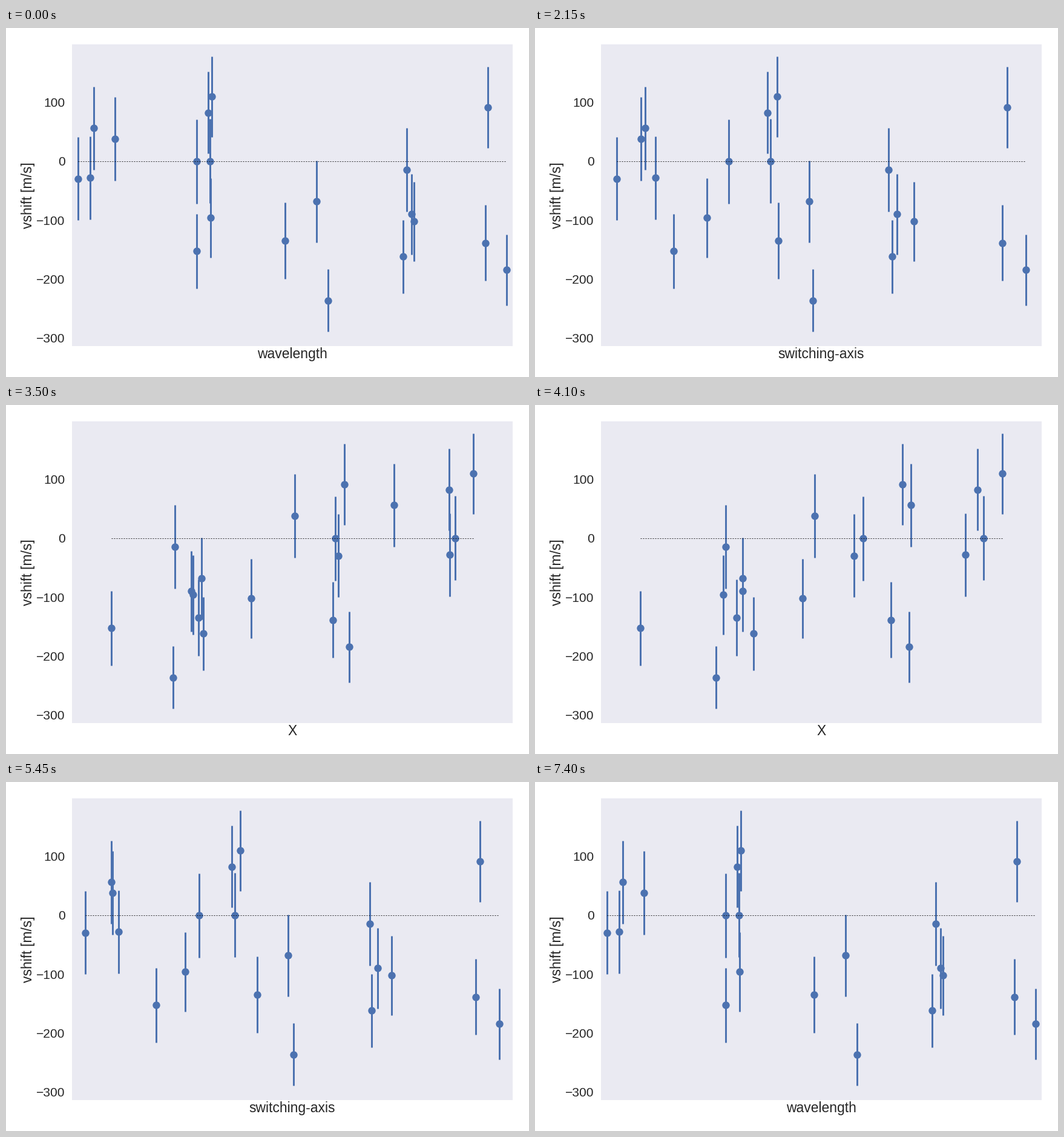
Recreate the animation shown at these times as a matplotlib script. Size 864x576 px, loop 7.5 s.

```python
import numpy as np
import matplotlib.pyplot as plt
from matplotlib.animation import FuncAnimation

FRAMES, INTERVAL = 150, 50
PAD = 10
BLUE, INK, PANEL = "#4C72B0", "#262626", "#EAEAF2"

plt.rcParams["font.family"] = "Liberation Sans"

# Key points: wavelength, X, vshift
wave, pos, shift = np.array([
    (0, 15.1, -29.4), (20, 43.6, -28.3), (26, 29.2, 56.2), (61, 3.3, 38.2),
    (196, 12.5, -0.6), (196, -45.4, -152.6), (215, 41.7, 82.4),
    (221, 48, 109.4), (218, 43.2, 0.4), (219, -24.4, -96.1),
    (341, -24.1, -134.9), (393, -23.8, -68.4), (412, -31.3, -236),
    (536, -24.6, -161.9), (542, -32, -14.6), (550, -27.9, -90),
    (554, -12.4, -102.3), (672, 7.6, -138.6), (676, 10.5, 91.4),
    (707, 11.5, -184.6),
]).T

# Errors shrink away from zero shift.
err = 71 - 0.0003 * (shift - 10) ** 2

# At 72 dpi one point is one pixel.
W, H = 864, 576
fig = plt.figure(figsize=(W / 72, H / 72), dpi=72, facecolor="white")
ax = fig.add_axes([109.2 / W, 51.2 / H, 727.7 / W, 498.1 / H], facecolor=PANEL)
ax.set_ylim(-313.4, 198.6)
ax.set_xticks([])
ax.set_yticks(range(-300, 101, 100))
ax.tick_params(axis="y", length=0, pad=11.8, labelsize=21, labelcolor=INK)
for spine in ax.spines.values():
    spine.set_visible(False)

bars = ax.vlines(wave, shift - err, shift + err, color=BLUE, lw=3, zorder=2)
dots, = ax.plot(wave, shift, "o", color=BLUE, ms=12.4, mew=0, zorder=3)
zero, = ax.plot([], [], ls=(0, (2, 2)), color="black", lw=1, alpha=0.8,
                dash_capstyle="butt", zorder=4)

label_style = dict(size=22.9, color=INK, ha="center", va="baseline")
xlabel = fig.text(473 / W, 31 / H, "", **label_style)
fig.text(42.5 / W, 299.5 / H, "vshift [m/s]", rotation=90,
         rotation_mode="anchor", **label_style)


def axis_name(mix):
    if mix < 0.1:
        return "wavelength"
    if mix > 0.9:
        return "X"
    return "switching-axis"


def update(i):
    mix = (1 - np.cos(2 * np.pi * i / (FRAMES - 1))) / 2
    x = (1 - mix) * wave + mix * pos
    lo, hi = x.min(), x.max()
    bars.set_segments([[(a, s - e), (a, s + e)]
                       for a, s, e in zip(x, shift, err)])
    dots.set_xdata(x)
    zero.set_data([lo, hi], [0, 0])
    ax.set_xlim(lo - PAD, hi + PAD)
    xlabel.set_text(axis_name(mix))
    return bars, dots, zero, xlabel


anim = FuncAnimation(fig, update, frames=FRAMES, interval=INTERVAL,
                     repeat=True, repeat_delay=0, blit=False)
plt.show()
```
